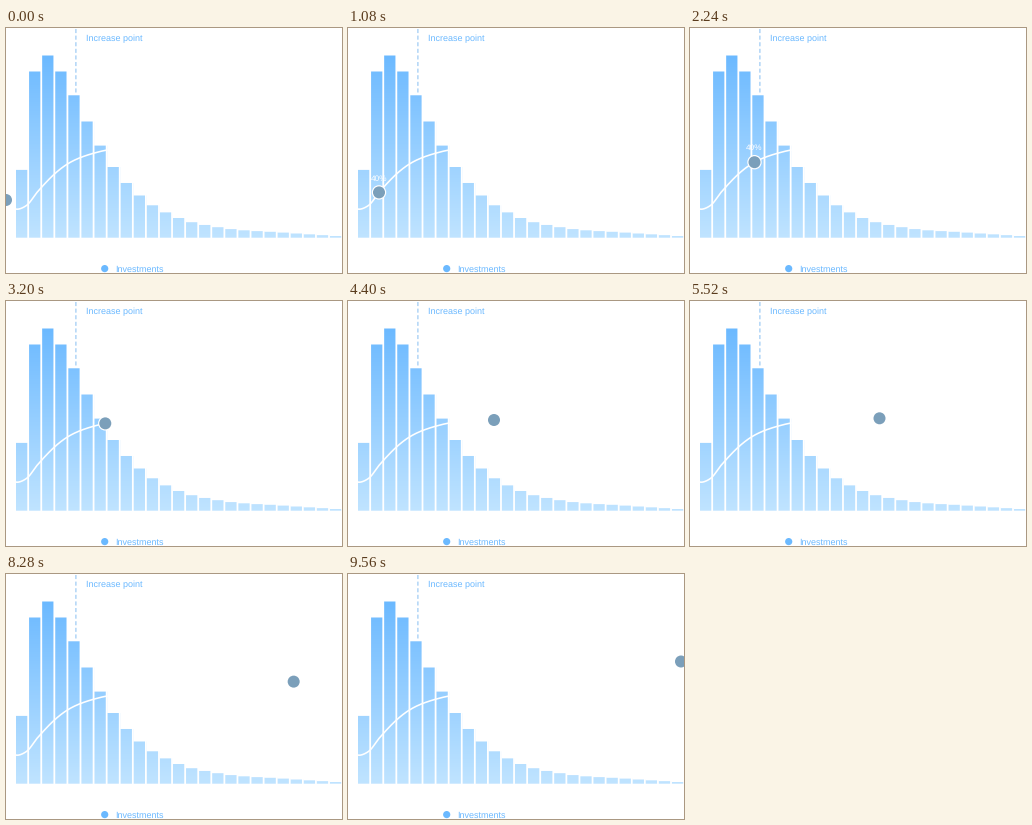
A matplotlib script for the animation above (9600 ms loop, 336 by 245 pixels).

```python
import numpy as np
import matplotlib.pyplot as plt
from matplotlib.animation import FuncAnimation
from matplotlib.colors import LinearSegmentedColormap
from matplotlib.patches import Circle, Rectangle

plt.rcParams["text.hinting"] = "none"

W, H, DPI = 336, 245, 100
STEP, FRAMES = 40, 240
BLUE = "#6bb9ff"
BARS, LEFT, PITCH, GAP = 25, 10, 13.08, 1.8
BASE, PEAK = 209.7, 27


def spline(keys):
    """Smooth curve through rows of (parameter, value, ...)."""
    keys = np.array(keys, float)
    knots, values = keys[:, 0], keys[:, 1:]
    slopes = np.gradient(values, knots, axis=0)

    def at(t):
        i = np.clip(np.searchsorted(knots, t, side="right") - 1,
                    0, len(knots) - 2)
        span = knots[i + 1] - knots[i]
        u = (t - knots[i]) / span
        return ((1 + 2 * u) * (1 - u) ** 2 * values[i]
                + u * (1 - u) ** 2 * span * slopes[i]
                + u * u * (3 - 2 * u) * values[i + 1]
                + u * u * (u - 1) * span * slopes[i + 1])

    return at


# bar index -> height, and time in ms -> marker position
bar_height = spline([(0, 68.3), (1, 166.7), (2, 182.7), (3, 166.7),
                     (5, 116.7), (7, 71.2), (9, 42.7), (12, 20.2),
                     (15, 11), (20, 5.6), (24, 2.2)])
marker_at = spline([(0, 0, 172), (400, 10.8, 181.2), (680, 20.3, 177.6),
                    (1080, 31, 164.4), (2240, 64.5, 134.2),
                    (3040, 93.3, 123.7), (4400, 146, 119),
                    (5520, 189.5, 117.3), (7000, 244.5, 113.4),
                    (8000, 278, 110.4), (9560, 333, 87.5)])


def px(n):
    return n * 72 / DPI


def label(x, y, text, size, color, **kw):
    return ax.text(x, y, text, fontsize=px(size), color=color,
                   family="Liberation Sans", va="baseline", **kw)


def blank(x, y, w, h):
    ax.add_patch(Rectangle((x, y), w, h, fc="white", lw=0, snap=False,
                           zorder=2))


fig = plt.figure(figsize=(W / DPI, H / DPI), dpi=DPI, facecolor="white")
ax = fig.add_axes([0, 0, 1, 1])
ax.axis("off")

# one gradient behind everything; white shapes cut the bars out of it
shade = LinearSegmentedColormap.from_list("shade", [BLUE, "#c0e4ff"])
ax.imshow(np.linspace(0, 1, 256)[:, None], cmap=shade, aspect="auto",
          extent=(0, W, BASE + 1, PEAK - 1), interpolation="bilinear")
ax.set_xlim(0, W)
ax.set_ylim(H, 0)

tops = [BASE - bar_height(k)[0] for k in range(BARS)]
edges = LEFT - GAP / 2 + PITCH * np.arange(BARS + 1)
ax.fill_between(edges, 0, tops + tops[-1:], step="post", color="white",
                lw=0, snap=False, zorder=2)
for edge in edges:
    blank(edge - GAP / 2, 0, GAP, H)
blank(0, 0, LEFT, H)
blank(0, BASE, W, H - BASE)

curve = np.array([marker_at(t) for t in np.linspace(0, 3240, 160)])
ax.plot(curve[:, 0], curve[:, 1], color="white", lw=px(1.6), zorder=3)

ax.plot([69.9, 69.9], [1, 66], color="#9ccaf4", lw=px(1.2), dashes=(3.4, 2.1),
        dash_capstyle="butt", snap=False, zorder=3)
label(80, 13.2, "Increase point", 9, BLUE)
ax.add_patch(Circle((98.7, 240.6), 3.6, fc=BLUE, ec="none", zorder=3))
label(109.2, 243.7, "Investments", 9, BLUE)

ring = ax.add_patch(Circle((0, 0), 7.2, fc="white", ec="none", zorder=4))
ball = ax.add_patch(Circle((0, 0), 6, fc="#7b9fba", ec="none", zorder=5))
percent = label(0, 0, "40%", 8.3, "white", ha="center", zorder=6,
                clip_on=True)


def draw(i):
    x, y = marker_at(i * STEP)
    ring.center = ball.center = (x, y)
    percent.set_position((x, y - 11.8))
    return ring, ball, percent


anim = FuncAnimation(fig, draw, frames=FRAMES, interval=STEP, repeat=True,
                     repeat_delay=0, blit=False)
plt.show()
```
